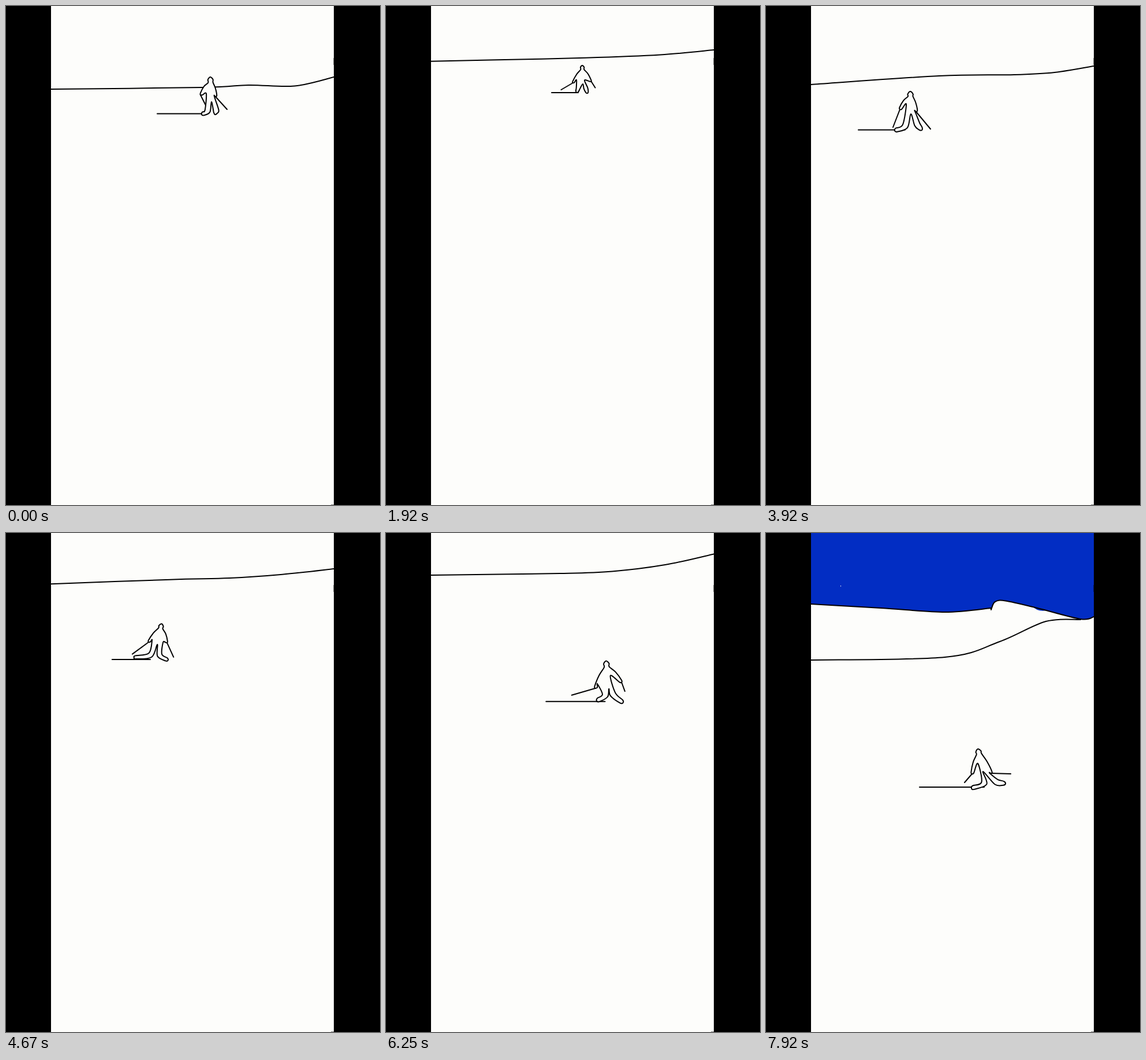
Recreate the animation shown at these times as an HTML page. Size 648 px wide and 864 px high, loop 8 s.

```html
<!DOCTYPE html>
<html lang="en">
<head>
<meta charset="utf-8">
<title>Skier line drawing</title>
<style>
  html, body { margin: 0; width: 100%; height: 100%; overflow: hidden; background: #000; }
  svg { display: block; width: 648px; height: 864px; }
  .ink { fill: none; stroke: #000; stroke-width: 2; stroke-linecap: round; stroke-linejoin: round; }
  #body { fill: #fdfdfb; }
</style>
</head>
<body>
<svg viewBox="0 0 648 864">
  <defs><clipPath id="page"><rect x="78" width="490" height="864"/></clipPath></defs>
  <rect width="648" height="864" fill="#000"/>
  <rect x="78" width="490" height="864" fill="#fdfdfb"/>
  <g clip-path="url(#page)">
    <g id="mountain">
      <path id="sky" fill="#022dc3"/>
      <path d="M462 127Q470 137 487 134Z" fill="#022dc3"/>
      <path id="ridge" class="ink"/>
    </g>
    <rect x="129" y="91" width="1" height="1.5" fill="#fdfdfb"/>
    <path id="ground" class="ink"/>
  </g>
  <g id="skier" class="ink">
    <path id="gear"/>
    <path id="body"/>
  </g>
  <path d="M567.75 90V102M563 863.5H568" stroke="#000" stroke-width=".5"/>
</svg>
<script>
const FRAME = 1000 / 12, FRAMES = 96;
const $ = id => document.getElementById(id);
const points = text => text.split(' ').map(pair => pair.split(',').map(Number));

// joints: head, right hand, armpit, ankle, toe, crotch, left toe, ankle, armpit, hand
// gear: left pole tip, right pole tip, start of the trail
// hop: how far ground and skier swing vertically on the way to the next pose
const pose = (at, joints, gear, ground, hop = [0, 0]) =>
  ({ at, joints: points(joints), gear: points(gear), ground: points(ground), hop });

const poses = [
  pose(0, '354,123 363,157 363,163 364,181 362,188 356,166 339,188 349,182 347,152 337,154',
    '346,172 383,179 262,186.5', '78,144 340,141 420,137 500,138.5 568,123', [-58, 52]),
  pose(14, '368,68 372,96 366,96 358,108 356,117 359,98 331,114 343,106 351,91 342,95',
    '324,106 385,110 302,115', '78,48 170,44 310,46.5 460,36.5 568,38', [20, 0]),
  pose(32, '312,138 339,165 322,161 334,176 342,185 323,172 330,186 323,178 309,165 306,171',
    '283,184 340,173 272,185', '78,103.5 190,103 380,93 490,92.5 568,74', [-15, 0]),
  pose(47, '250,148 260,183 260,187 262,205 270,215 251,187 223,216 241,208 243,170 232,179',
    '220,210 285,213 160,214.5', '78,136 300,121 430,119 500,115 568,104', [-44, -20]),
  pose(64, '287,203 296,234 283,229 270,255 290,263 272,236 221,253 258,252 262,237 261,235',
    '218,247 295,254 205,260.5', '78,128.5 270,127.5 350,124.5 460,116 568,107.5', [-49, -45]),
  pose(85, '467,324 510,366 485,349 505,387 520,408 490,386 496,411 490,394 461,369 456,385',
    '416,397 522,378 343,406', '78,116 330,111 430,107 505,93 568,65'),
  pose(95, '367,374 390,416 390,418 399,431 415,434 376,413 356,442 378,433 367,399 357,417',
    '344,432 424,417 266,440', '78,220 310,215 405,188 485,153 545,150')
];

const mix = (a, b, k) => a + (b - a) * k;
const between = (p, q, k = 0.5) => p.map((v, i) => mix(v, q[i], k));
const shift = (p, dir, by) => p.map((v, i) => v + dir[i] * by);
const outward = ([x, y]) => [y, -x];

function heading(from, to) {
  const dx = to[0] - from[0], dy = to[1] - from[1], length = Math.hypot(dx, dy) || 1;
  return [dx / length, dy / length];
}

function spline(pts, closed) {
  const n = pts.length;
  const at = i => closed ? pts[(i + n) % n] : pts[Math.min(n - 1, Math.max(0, i))];
  let d = 'M' + pts[0];
  for (let i = 0; i < (closed ? n : n - 1); i++) {
    const [a, b, c, e] = [at(i - 1), at(i), at(i + 1), at(i + 2)];
    const out = b.map((v, k) => v + (c[k] - a[k]) / 6);
    const into = c.map((v, k) => v - (e[k] - b[k]) / 6);
    d += `C${out} ${into} ${c}`;
  }
  return closed ? d + 'Z' : d;
}

// A rounded end of the given half width, pointing away from root.
function tip(root, end, width) {
  const dir = heading(root, end), side = outward(dir), base = shift(end, dir, -width);
  return [shift(base, side, width), end, shift(base, side, -width)];
}

function leg(root, ankle, toe, unit) {
  const side = outward(heading(root, toe));
  return [shift(ankle, side, unit), ...tip(ankle, toe, unit * 0.7), shift(ankle, side, -unit)];
}

function outline([head, handR, pitR, ankleR, toeR, crotch, toeL, ankleL, pitL, handL]) {
  const unit = (toeL[1] - head[1]) / 14;
  const neck = between(head, crotch, 0.22), across = outward(heading(head, neck));
  const shoulder = (hand, sign) =>
    shift(between(neck, hand, 0.45), outward(heading(neck, hand)), sign * unit);
  const shoulderR = shoulder(handR, 1), shoulderL = shoulder(handL, -1);
  return [
    ...tip(neck, head, unit * 0.95),
    shift(neck, across, unit * 0.9),
    shoulderR, ...tip(between(shoulderR, pitR), handR, unit * 0.5), pitR,
    ...leg(between(pitR, crotch), ankleR, toeR, unit), crotch,
    ...leg(between(crotch, pitL), ankleL, toeL, unit), pitL,
    ...tip(between(pitL, shoulderL), handL, unit * 0.5), shoulderL,
    shift(neck, across, -unit * 0.9)
  ];
}

const ridge = spline(points('78,123 200,130 310,137 390,130')) + 'V133' +
  spline(points('391,130 397,119 415,117.5 470,130 545,149 568,145')).replace('M', 'L');
$('ridge').setAttribute('d', ridge);
$('sky').setAttribute('d', ridge + 'V-200H78Z');

function draw(frame) {
  const next = Math.max(1, poses.findIndex(pose => pose.at >= frame));
  const from = poses[next - 1], to = poses[next];
  const k = (frame - from.at) / (to.at - from.at), swing = Math.sin(Math.PI * k);
  const part = name => from[name].map((p, i) => between(p, to[name][i], k));
  const move = (id, y) => $(id).setAttribute('transform', `translate(0 ${y})`);

  const joints = part('joints'), [poleL, poleR, trail] = part('gear');
  const handR = joints[1], ankleL = joints[7], handL = joints[9];
  $('body').setAttribute('d', spline(outline(joints), true));
  $('gear').setAttribute('d', `M${handL}L${poleL}M${handR}L${poleR}M${trail}H${ankleL[0]}`);
  $('ground').setAttribute('d', spline(part('ground')));
  move('ground', from.hop[0] * swing);
  move('skier', from.hop[1] * swing);
  move('mountain', next === poses.length - 1 ? mix(-160, 0, k) : -160);
}

function tick() {
  // Small lead keeps each drawing on its rounded start time.
  draw(Math.floor((performance.now() + 3.4) / FRAME) % FRAMES);
  requestAnimationFrame(tick);
}
tick();
</script>
</body>
</html>
```
